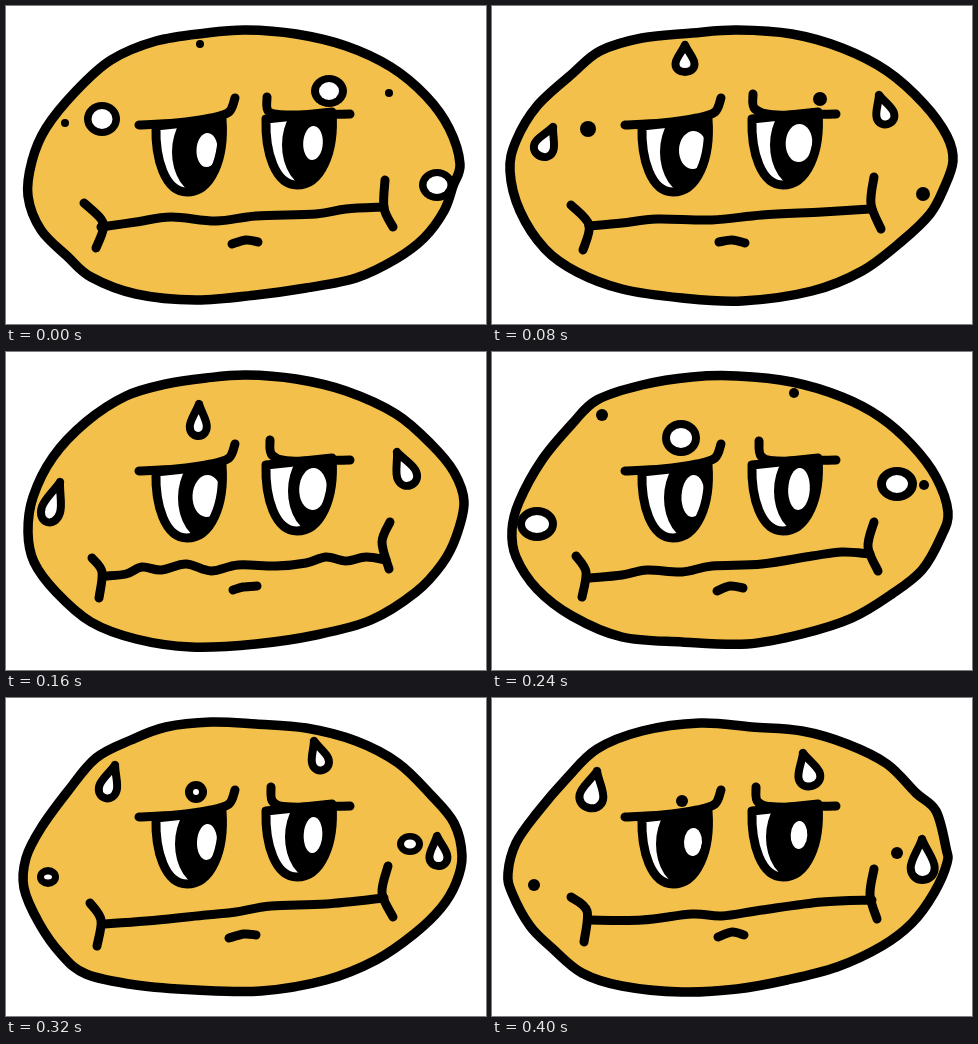
Recreate the animation shown at these times as an HTML page with a canvas. Size 480 px wide and 318 px high, loop 480 ms.

```html
<!DOCTYPE html>
<html lang="en">
<head>
<meta charset="utf-8">
<title>Nervous potato</title>
<style>
  html, body { margin: 0; height: 100%; overflow: hidden; background: #fff; }
  canvas { display: block; width: 480px; height: 318px; }
</style>
</head>
<body>
<canvas id="stage" width="480" height="318"></canvas>
<script>
const ctx = document.getElementById('stage').getContext('2d');
const STEP = 80, INK = '#000', SKIN = '#f3c14b', WHITE = '#fff';

// Smooth curve through a flat list of x, y pairs
function curve(pts, closed) {
  const n = pts.length / 2;
  const at = i => {
    i = closed ? (i + n) % n : Math.max(0, Math.min(n - 1, i));
    return [pts[2 * i], pts[2 * i + 1]];
  };
  const path = new Path2D();
  path.moveTo(...at(0));
  for (let i = 0; i < (closed ? n : n - 1); i++) {
    const [a, b, c, d] = [at(i - 1), at(i), at(i + 1), at(i + 2)];
    path.bezierCurveTo(
      b[0] + (c[0] - a[0]) / 6, b[1] + (c[1] - a[1]) / 6,
      c[0] - (d[0] - b[0]) / 6, c[1] - (d[1] - b[1]) / 6, ...c);
  }
  if (closed) path.closePath();
  return path;
}

function ink(path, width = 9, fill) {
  if (fill) { ctx.fillStyle = fill; ctx.fill(path); }
  ctx.lineWidth = width;
  ctx.strokeStyle = INK;
  ctx.stroke(path);
}

const line = pts => ink(curve(pts));

function oval(x, y, rx, ry, fill, turn = 0) {
  ctx.beginPath();
  ctx.ellipse(x, y, rx, ry, turn, 0, 7);
  ctx.fillStyle = fill;
  ctx.fill();
}

const dot = (x, y, r) => () => oval(x, y, r, r, INK);

const ring = (x, y, rx, ry, holeX, holeY) => () => {
  oval(x, y, rx, ry, INK);
  oval(x, y, holeX, holeY, WHITE);
};

// Sweat drop from its tip to its bottom, w is half its width
const tear = (x, y, bx, by, w) => () => {
  const len = Math.hypot(bx - x, by - y);
  const path = new Path2D();
  path.moveTo(0, 0);
  path.bezierCurveTo(w * .4, len * .3, w, len * .5, w, len * .7);
  path.bezierCurveTo(w, len * 1.1, -w, len * 1.1, -w, len * .7);
  path.bezierCurveTo(-w, len * .5, -w * .4, len * .3, 0, 0);
  ctx.save();
  ctx.translate(x, y);
  ctx.rotate(Math.atan2(x - bx, by - y));
  ink(path, 8, WHITE);
  ctx.restore();
};

const EYE = new Path2D('M-33-28C-34 5-24 38-2 38C22 38 36 5 33-35Z');

function eye(x, y, iris, glintX, rx, ry) {
  ctx.save();
  ctx.translate(x, y);
  ctx.save();
  ctx.clip(EYE);
  ctx.fillStyle = WHITE;
  ctx.fill(EYE);
  oval(iris + 28, -2, 28, 42, INK);
  oval(glintX, -4, rx, ry, WHITE, .05);
  ctx.restore();
  ink(EYE);
  ctx.restore();
}

const poses = [];
const pose = p => poses.push(p);

// eyes: iris edge, glint radii; brow: tip x and y of the right brow
pose({
  body: [200,27, 240,24, 290,28, 340,40, 385,61, 420,90, 443,122, 454,158, 447,180, 438,205,
    418,232, 390,253, 350,272, 300,282, 250,289, 190,294, 130,288, 85,271, 62,251, 35,224,
    22,190, 26,155, 40,122, 70,85, 105,54, 150,35],
  mouth: [95,221, 130,216, 165,211, 210,215, 250,210, 310,208, 340,203, 378,201],
  left: [78,197, 95,213, 97,224, 90,242], right: [379,174, 378,202, 387,221],
  chin: [226,238, 240,234, 252,236],
  eyes: [-17, 10.5, 17], brow: [261,91],
  spots: [ring(96,113,18,17,10.5,10), ring(323,85,18,16,10,9), ring(431,179,18,16,10.5,9),
    dot(194,38,4), dot(383,87,4), dot(59,117,4)]
});
pose({
  body: [200,27, 245,24, 300,28, 350,42, 395,65, 432,98, 455,130, 461,155, 452,182, 438,208,
    410,235, 370,265, 320,285, 250,295, 190,292, 130,283, 85,266, 53,243, 28,205, 18,165,
    24,135, 45,100, 80,68, 108,45, 150,32],
  mouth: [97,220, 130,217, 165,213, 220,214, 270,209, 330,206, 378,203],
  left: [79,199, 97,219, 91,244], right: [382,171, 379,198, 389,223],
  chin: [227,236, 240,234, 253,237],
  eyes: [-15, 14, 19], brow: [261,88],
  spots: [tear(193,39,193,66,9.5), tear(61,121,48,150,10), tear(387,89,396,118,9),
    dot(96,123,8), dot(328,93,7), dot(431,188,7)]
});
pose({
  body: [200,26, 240,23, 290,27, 340,39, 390,62, 425,92, 448,120, 458,150, 450,185, 436,212,
    410,240, 365,268, 310,283, 250,292, 185,295, 130,287, 85,270, 50,240, 28,210, 22,180,
    27,145, 47,105, 80,70, 120,44, 160,32],
  mouth: [100,224, 120,222, 136,215, 155,218, 180,212, 205,219, 232,213, 270,214, 300,211,
    320,205, 340,209, 360,205, 380,208],
  left: [86,206, 96,220, 93,246], right: [384,170, 376,190, 383,217],
  chin: [227,238, 237,235, 251,234],
  eyes: [-11, 14.5, 21], brow: [264,88],
  spots: [tear(193,52,192,84,8.5), tear(54,130,41,170,9.5), tear(391,100,405,133,10)]
});
pose({
  body: [200,25, 245,24, 300,30, 350,45, 388,65, 420,93, 444,125, 456,160, 449,185, 430,218,
    400,242, 360,266, 310,282, 255,292, 190,290, 130,285, 80,264, 45,237, 24,205, 20,178,
    27,150, 50,108, 80,72, 105,48, 150,33],
  mouth: [98,226, 130,223, 155,218, 190,220, 220,214, 270,212, 320,204, 350,200, 378,202],
  left: [84,204, 94,220, 90,245], right: [382,170, 376,195, 386,219],
  chin: [225,239, 238,234, 251,236],
  eyes: [-11, 11.5, 21], brow: [267,89],
  spots: [ring(189,86,19,18,11,10), ring(45,172,20,17,12,9), ring(405,132,20,17,11,9),
    dot(110,63,6), dot(302,41,5), dot(432,133,5)]
});
pose({
  body: [205,24, 250,26, 300,30, 350,43, 392,65, 425,97, 448,125, 456,158, 450,185, 435,210,
    408,236, 370,262, 320,282, 255,293, 190,292, 130,287, 80,276, 55,256, 33,225, 18,190,
    20,160, 35,130, 62,93, 90,60, 125,42, 160,29],
  mouth: [97,226, 140,223, 200,217, 230,214, 265,208, 320,206, 378,200],
  left: [84,205, 95,222, 91,248], right: [382,168, 376,195, 387,219],
  chin: [223,240, 238,236, 250,237],
  eyes: [-14, 10, 18], brow: [265,89],
  spots: [tear(109,67,99,100,9), tear(308,43,317,72,8.5), tear(431,138,433,168,9),
    ring(190,94,11,11,3,3), ring(42,179,11,10,4,2.5), ring(404,146,13,11,6,4.5)]
});
pose({
  body: [208,25, 260,29, 310,33, 355,46, 395,66, 424,95, 444,113, 454,150, 455,165, 442,195,
    420,225, 390,248, 345,269, 295,282, 245,291, 190,294, 130,288, 90,275, 60,250, 38,228,
    20,195, 16,175, 24,145, 45,115, 75,80, 105,51, 150,33],
  mouth: [97,222, 150,222, 200,216, 230,218, 270,212, 330,204, 380,202],
  left: [79,199, 95,213, 92,244], right: [382,171, 378,197, 385,221],
  chin: [226,239, 240,234, 252,237],
  eyes: [-19, 9, 14], brow: [264,89],
  spots: [tear(105,73,97,110,12), tear(311,55,320,88,11), tear(430,141,431,182,12),
    dot(190,103,6), dot(42,187,6), dot(405,155,6)]
});

function draw({ body, mouth, left, right, chin, eyes, brow, spots }) {
  const [iris, rx, ry] = eyes, [x, y] = brow;
  ctx.fillStyle = WHITE;
  ctx.fillRect(0, 0, 480, 318);
  ink(curve(body, true), 9.5, SKIN);
  eye(183, 148, iris, 18, rx, ry);
  eye(293, 141, iris, 14, rx - .7, ry);
  line([133,119, 170,117, 205,112, 223,106, 229,92]);
  line([x,y, x + 2,y + 15, 285,109, 344,108]);
  [mouth, left, right, chin].forEach(line);
  spots.forEach(spot => spot());
}

ctx.lineCap = ctx.lineJoin = 'round';
const start = performance.now();
function tick() {
  const t = performance.now() - start;
  draw(poses[Math.floor(t / STEP) % poses.length]);
  requestAnimationFrame(tick);
}
tick();
</script>
</body>
</html>
```
